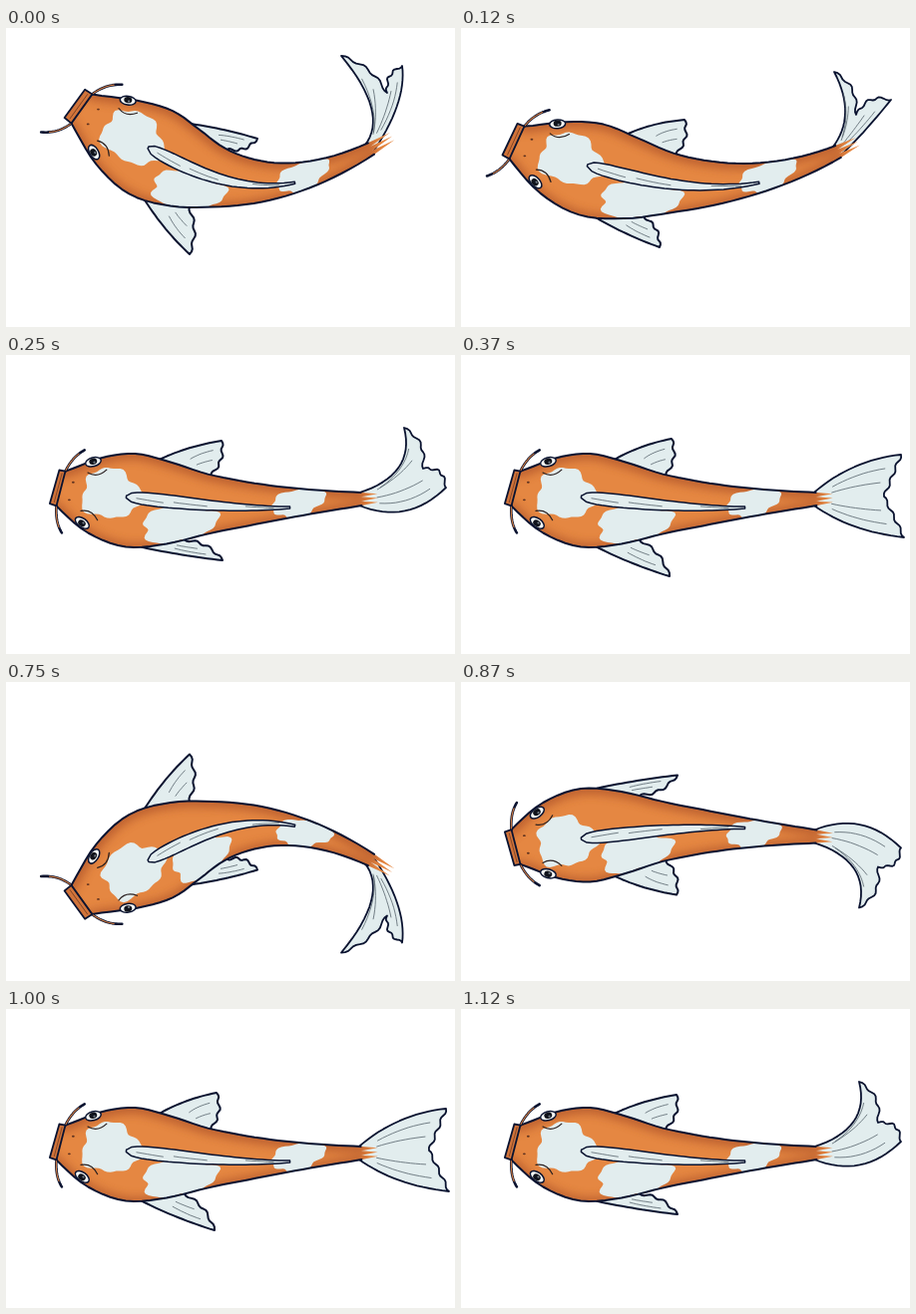
An HTML page for the animation above (1.25 s loop, 450 by 300 pixels).

```html
<!DOCTYPE html>
<html lang="en">
<head>
<meta charset="utf-8">
<title>Swimming koi</title>
<style>
  html, body { margin: 0; width: 100%; height: 100%; overflow: hidden; background: #fff; }
  svg { display: block; width: 100%; height: 100%; }
  path, ellipse { stroke-linejoin: round; stroke-linecap: round; }
</style>
</head>
<body>
<svg id="stage" viewBox="0 0 450 300"></svg>
<script>
const INK = '#0a1330', ORANGE = '#e58742', SHADE = '#b0552c', PALE = '#e2edee', RAY = '#56636b';
const LOOP = 1250, MIRROR = 299.5, LENGTH = 301;
const GIRTH = [18, 38, 47, 41, 30, 22, 15.5, 10.5, 6.5]; // half widths, nose to tail

// spine: cubic Bezier; tips: pectoral fins; tail: tip, control, notch, control, tip;
// flare: bulge of the tail's rear edge; whisker: sweep of the outer barbel
const up = {
  side: 1, flare: 6, whisker: -16,
  spine: [[76, 81], [171, 149], [251, 184], [366, 121]],
  tips: [[252, 111], [184, 227]],
  tail: [[336, 28], [384, 86], [382, 65], [402, 75], [397, 38]]
};
const rise = {
  side: 1, flare: 8, whisker: -12,
  spine: [[56, 115], [150, 158], [268, 177], [378, 124]],
  tips: [[224, 92], [199, 220]],
  tail: [[374, 44], [397, 88], [396, 87], [402, 108], [431, 72]]
};
const level = {
  side: 1, flare: 0, whisker: 12,
  spine: [[55, 134], [140, 156], [262, 150], [356, 144.5]],
  tips: [[211, 84], [209, 222]],
  tail: [[441, 100], [392, 105], [424, 142], [390, 177], [444, 183]]
};
const curl = {
  ...level, flare: 8,
  tips: [[216, 86], [217, 206]],
  tail: [[399, 73], [411, 120], [418, 114], [402, 171], [441, 133]]
};

function mirror(pose) {
  const flip = list => list.map(([x, y]) => [x, MIRROR - y]);
  return { ...pose, side: -pose.side, spine: flip(pose.spine), tips: flip(pose.tips), tail: flip(pose.tail) };
}
const dip = mirror(curl), down = mirror(up);

const timeline = [[0, up], [120, rise], [250, curl], [370, level], [620, dip],
  [750, down], [870, dip], [1000, level], [1120, curl]];

const sample = (n, f) => Array.from({ length: n + 1 }, (_, i) => f(i / n));
const mix = (a, b, f) => a.map((v, k) => v + (b[k] - v) * f);
const path = points => 'M' + points.map(p => p.map(v => v.toFixed(1)).join(' ')).join('L');
const shape = (points, fill, stroke = 'none', width = 2) =>
  `<path d="${path(points)}" fill="${fill}" stroke="${stroke}" stroke-width="${width}"/>`;
const line = (points, color = INK, width = 2) => shape(points, 'none', color, width);
const each = (list, draw) => list.map(draw).join('');

function bezier(points, f) {
  while (points.length > 1) points = points.slice(1).map((p, i) => mix(points[i], p, f));
  return points[0];
}
const bend = (...points) => sample(16, f => bezier(points, f));

function girth(u) {
  const x = Math.max(0, Math.min(1, u)) * (GIRTH.length - 1);
  const i = Math.min(GIRTH.length - 2, Math.floor(x)), f = x - i;
  const b = GIRTH[i], c = GIRTH[i + 1];
  const a = GIRTH[i - 1] ?? 2 * b - c, d = GIRTH[i + 2] ?? 2 * c - b;
  return b + f / 2 * (c - a + f * (2 * a - 5 * b + 4 * c - d + f * (3 * (b - c) + d - a)));
}

// Wavy rear edge of a fin, bulging away from the body.
function hem(a, b, bulge) {
  const [dx, dy] = [b[0] - a[0], b[1] - a[1]], size = Math.hypot(dx, dy);
  return sample(18, f => {
    const out = (bulge * Math.sin(Math.PI * f) + Math.sign(bulge || 1) * 1.3 * Math.sin(6 * Math.PI * f)) / size;
    return [a[0] + dx * f + dy * out, a[1] + dy * f - dx * out];
  });
}

function koi(p) {
  const s = p.side;
  const tilt = u => {
    const a = bezier(p.spine, u - 0.01), b = bezier(p.spine, u + 0.01);
    return Math.atan2(b[1] - a[1], b[0] - a[0]);
  };
  // Point beside the spine; positive offsets lie below it.
  const at = (u, off) => {
    const [x, y] = bezier(p.spine, u), t = tilt(u);
    return [x - off * Math.sin(t), y + off * Math.cos(t)];
  };
  const flank = side => sample(40, u => at(u, side * girth(u)));
  const top = flank(-1), bottom = flank(1);
  const fray = sample(6, f => at(1 + (Math.round(f * 6) % 2) * 0.06, (f * 2 - 1) * GIRTH.at(-1)));
  const body = [...top, ...fray, ...bottom.slice().reverse()];

  const patch = (u, off, rx, ry, skew, seed) => sample(60, f => {
    const a = f * 2 * Math.PI;
    const r = 1 + 0.08 * Math.sin(3 * a + seed) + 0.07 * Math.sin(5 * a + 2 * seed) + 0.05 * Math.sin(9 * a);
    const dy = ry * r * Math.sin(a);
    return at(u + (rx * r * Math.cos(a) + skew * dy) / LENGTH, off + dy);
  });

  function pectoral(tip, i) {
    const side = i ? s : -s;
    const [from, to] = i ? [0.3, 0.43] : [0.34, 0.51];
    const root = u => at(u, side * girth(u));
    const a = root(from), b = root(to);
    const lead = mix(mix(a, tip, 0.5), b, -0.15);
    const rear = hem(tip, b, -side * 5);
    const rays = [0.25, 0.55].map(f => bend(mix(a, b, 0.3 + f / 2), mix(lead, b, f), mix(tip, b, f)).slice(5, 15));
    return shape([...bend(a, lead, tip), ...rear], PALE, INK) + each(rays, r => line(r, RAY, 0.8));
  }

  function tail() {
    const [tip1, c1, notch, c2, tip2] = p.tail;
    const a = at(0.99, -s * 6), b = at(0.99, s * 6), root = mix(a, b, 0.5);
    const fan = (tip, c) => each([0.3, 0.65], f =>
      line(bend(root, mix(c, mix(root, notch, 0.5), f), mix(tip, notch, f)).slice(4, 15), RAY, 0.8));
    const outline = [...bend(a, c1, tip1), ...hem(tip1, notch, s * p.flare),
      ...hem(notch, tip2, s * p.flare), ...bend(tip2, c2, b)];
    return shape(outline, PALE, INK, 1.8) + fan(tip1, c1) + fan(tip2, c2);
  }

  function dorsal() {
    const edge = side => sample(30, f => {
      const middle = s * (8 * f * f * (3 - 2 * f) - 3);
      return at(0.235 + 0.525 * f, middle + side * (1 + 5.5 * Math.sin(Math.PI * f ** 0.45)));
    });
    const upper = edge(-1), lower = edge(1);
    const ray = (i, n) => sample(n, f => mix(upper[i + f * n], lower[i + f * n], 0.3 + 0.4 * f));
    return [...upper, ...lower.reverse(), upper[0]].length &&
      shape([...upper, ...lower, upper[0]], PALE, INK, 1.5) +
      each([[2, 5], [9, 6], [22, 5]], ([i, n]) => line(ray(i, n).map((q, k) => at(0.235 + 0.0175 * (i + k), s * (k / 2 - 3 + i / 4))), RAY, 0.8));
  }

  function face(side) {
    const [x, y] = at(0.1, side * 31 - 2 * s);
    const turn = tilt(0.1) * 180 / Math.PI + side * 25;
    const sweep = side === s ? p.whisker : 17;
    const corner = at(0, side * 18), end = at(sweep / LENGTH, side * 43);
    const barbel = bend(corner, at(sweep / 4 / LENGTH, side * 34), end);
    const [nx, ny] = at(0.04, side * 9);
    return line(barbel, INK, 2.6) + line(barbel.slice(0, 13), '#cf7a40', 1.1) +
      `<g transform="translate(${x} ${y}) rotate(${turn}) scale(1 ${side})">
        <ellipse rx="8" ry="4.4" fill="#f4f7f5" stroke="${INK}" stroke-width="1.5"/>
        <ellipse cy=".6" rx="4" ry="3.1" fill="#10131c"/>
        <ellipse cx="1" cy="-.6" rx="1.2" ry=".9" fill="#77808a"/>
        <path d="M-8 -9Q0 -17 11 -11" fill="none" stroke="#2a2020" stroke-width="1.2"/>
      </g><ellipse cx="${nx}" cy="${ny}" rx="1.4" ry=".9" fill="#5e3220"/>`;
  }

  const patches = [patch(0.18, -4 * s, 31, 25, 0, 1), patch(0.41, 20, 34, 20, -0.4, 2), patch(0.79, 0, 25, 15, -0.6, 4)];
  const mouth = [at(0, -18), at(0, 18), at(-0.025, 17.5), at(-0.025, -17.5), at(0, -18)];
  return `<defs>
      <clipPath id="skin"><path d="${path(body)}"/></clipPath>
      <filter id="soft" x="-20%" y="-20%" width="140%" height="140%"><feGaussianBlur stdDeviation="4"/></filter>
    </defs>
    ${each(p.tips, pectoral)}${tail()}${shape(body, ORANGE)}
    <g clip-path="url(#skin)">
      <g filter="url(#soft)" opacity=".7">${line(top, SHADE, 13)}${line(bottom, SHADE, 9)}</g>
      ${each(patches, q => shape(q, PALE))}
    </g>
    ${line(top)}${line(bottom)}${dorsal()}
    ${each([-1, 1], face)}
    ${shape(mouth, '#d2743a', INK, 1.8)}
    ${line([at(-0.011, -15), at(-0.011, 15)], '#6d3a22', 0.8)}`;
}

const stage = document.getElementById('stage');
const start = performance.now();
let shown = null;

function render(ms) {
  const t = ((ms % LOOP) + LOOP) % LOOP;
  const pose = timeline.filter(([from]) => from <= t).pop()[1];
  if (pose !== shown) {
    stage.innerHTML = koi(pose);
    shown = pose;
  }
}

function tick() {
  render(performance.now() - start);
  requestAnimationFrame(tick);
}
tick();
</script>
</body>
</html>
```
